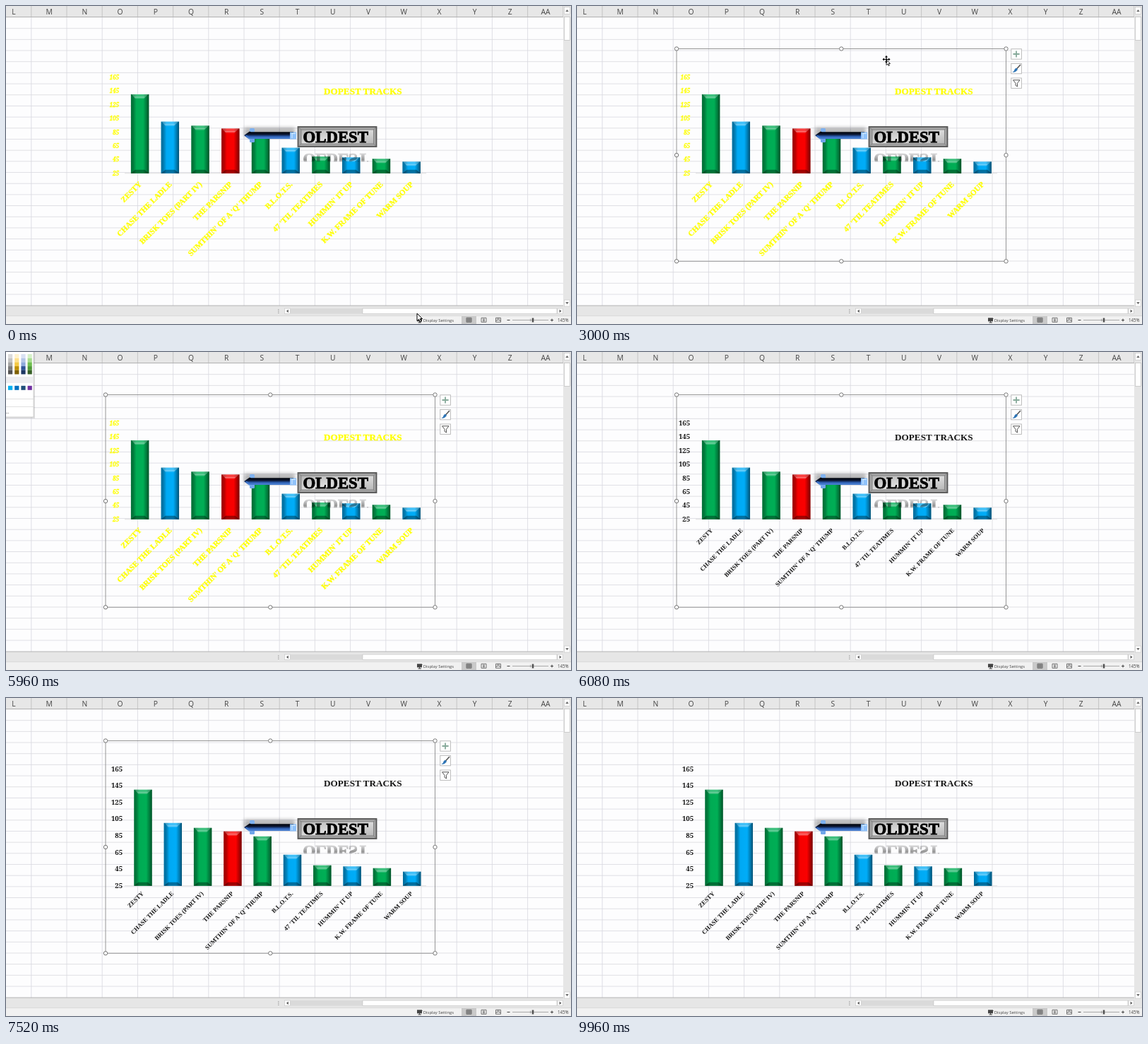
Write an HTML page that moves like this. It is 800x450 px and loops after 10 s.

```html
<!DOCTYPE html>
<html lang="en">
<head>
<meta charset="utf-8">
<title>Chart text colour</title>
<style>
html, body { margin: 0; width: 100%; height: 100%; overflow: hidden; background: #fdfdfe; }
svg { display: block; width: 100vw; height: 100vh; }
.ui { font-family: "Open Sans", "Noto Sans", sans-serif; fill: #444; }
.deco { font-family: "Liberation Serif", "Noto Serif", serif; font-weight: bold; }
.num { font-family: "Noto Serif", serif; font-weight: bold; }
</style>
</head>
<body>
<svg id="stage" viewBox="0 0 800 450">
  <defs>
    <linearGradient id="side">
      <stop offset="0" stop-opacity=".4"/>
      <stop offset=".14" stop-opacity=".3"/>
      <stop offset=".3" stop-opacity=".04"/>
      <stop offset=".68" stop-opacity=".02"/>
      <stop offset=".86" stop-opacity=".3"/>
      <stop offset="1" stop-opacity=".55"/>
    </linearGradient>
    <linearGradient id="shaft" x2="0" y2="1">
      <stop offset="0" stop-color="#000"/>
      <stop offset=".35" stop-color="#0a1530"/>
      <stop offset=".6" stop-color="#2d5fb4"/>
      <stop offset="1" stop-color="#8dbdf5"/>
    </linearGradient>
    <linearGradient id="plate" y2="1">
      <stop offset="0" stop-color="#b4b4b4"/>
      <stop offset=".5" stop-color="#dcdcdc"/>
      <stop offset="1" stop-color="#b8b8b8"/>
    </linearGradient>
    <linearGradient id="fade" gradientUnits="userSpaceOnUse" x1="0" y1="208" x2="0" y2="222">
      <stop offset="0" stop-color="#fff" stop-opacity=".12"/>
      <stop offset=".7" stop-color="#fff" stop-opacity=".42"/>
      <stop offset="1" stop-color="#fff" stop-opacity="0"/>
    </linearGradient>
    <mask id="mirror" maskUnits="userSpaceOnUse" x="410" y="205" width="120" height="20">
      <rect x="410" y="205" width="120" height="15.5" fill="url(#fade)"/>
    </mask>
    <filter id="blur" x="-30%" y="-100%" width="160%" height="300%"><feGaussianBlur stdDeviation="2.6"/></filter>
  </defs>
</svg>
<script>
const stage = document.getElementById('stage');
const LOOP = 10000;
const RECOLOR = 6080, SETTLED = 6400;

function set(node, attrs) {
  for (const key in attrs) node.setAttribute(key, attrs[key]);
  return node;
}
function el(tag, attrs, parent = stage) {
  return parent.appendChild(set(document.createElementNS('http://www.w3.org/2000/svg', tag), attrs));
}
const group = (parent) => el('g', {}, parent);
const rect = (x, y, width, height, fill, parent, more) =>
  el('rect', { x, y, width, height, fill, ...more }, parent);
const path = (d, attrs, parent) => el('path', { d, fill: 'none', ...attrs }, parent);
function text(str, x, y, size, cls, parent, more) {
  const t = el('text', { x, y, 'font-size': size, class: cls, ...more }, parent);
  t.textContent = str;
  return t;
}
const mix = (a, b, k) => a + (b - a) * k;
const clamp = (v) => Math.min(1, Math.max(0, v));
const ease = (k) => k * k * (3 - 2 * k);
const show = (node, on) => node.setAttribute('visibility', on ? 'visible' : 'hidden');

// Worksheet grid and column headings
const COL = 50.2, ROW = 15.68;
rect(0, 0, 800, 450, '#fdfdfe');
let lines = '';
for (let i = 0; i < 15; i++) lines += `M${35.8 + COL * i} 16V424`;
for (let i = 1; i <= 25; i++) lines += `M0 ${16 + ROW * i}H789`;
path(lines, { stroke: '#d9d9df', 'stroke-width': .8 });
rect(0, 0, 800, 15.6, '#e7e7e7');
path('M0 15.6H789', { stroke: '#a6a6a6', 'stroke-width': .9 });
'L M N O P Q R S T U V W X Y Z AA'.split(' ').forEach((name, i) => {
  text(name, 11 + COL * i, 12, 10.3, 'ui', stage, { 'text-anchor': 'middle', fill: '#333' });
  path(`M${35.8 + COL * i} 0V15`, { stroke: '#bdbdbd', 'stroke-width': .8 });
});

// Scroll bars
rect(789, 0, 11, 450, '#e6e6e6');
rect(790.5, 1.5, 8, 10, '#fdfdfd', stage, { stroke: '#c4c4c4', 'stroke-width': .6 });
path('M792.3 8L794.5 5L796.7 8Z', { fill: '#666' });
rect(790.5, 15.5, 8, 33, '#fff', stage, { stroke: '#bcbcbc', 'stroke-width': .7 });
rect(790.5, 416, 8, 9, '#fdfdfd', stage, { stroke: '#c4c4c4', 'stroke-width': .6 });
path('M792.3 419L794.5 422L796.7 419Z', { fill: '#666' });
rect(0, 424, 789, 14.5, '#e6e6e6');
path('M0 424H789', { stroke: '#ababab', 'stroke-width': .9 });
for (let i = 0; i < 3; i++) rect(385.3, 429.2 + i * 2.3, 1.1, 1.1, '#888');
rect(394.5, 428, 8, 7.5, '#fdfdfd', stage, { stroke: '#c4c4c4', 'stroke-width': .6 });
path('M399.8 429.5L397 431.8L399.8 434Z', { fill: '#555' });
rect(403, 428, 378, 7.5, '#dadada');
rect(505, 428, 275, 7.5, '#fff', stage, { stroke: '#c0c0c0', 'stroke-width': .6 });
rect(781, 428, 7.5, 7.5, '#fdfdfd', stage, { stroke: '#c4c4c4', 'stroke-width': .6 });
path('M783.6 429.5L786.4 431.8L783.6 434Z', { fill: '#555' });

// Status bar
rect(0, 438.5, 800, 11.5, '#f1f1f1');
path('M0 438.5H800', { stroke: '#d2d2d2', 'stroke-width': .7 });
rect(582, 441.3, 7, 5, '#444');
path('M583.5 448H588M585.5 446V448M586 446L589.5 442.5', { stroke: '#444', 'stroke-width': 1 });
text('Display Settings', 590.8, 447, 5.9, 'ui');
rect(645, 439, 21, 11, '#c9c9c9');
path('M652 441.3H659V447.3H652ZM652 443.3H659M652 445.3H659M654.3 441.3V447.3M656.7 441.3V447.3',
  { stroke: '#555', 'stroke-width': .8 });
path('M673 441.3H680V447.3H673ZM675 443H678M675 444.5H678M675 446H678', { stroke: '#555', 'stroke-width': .8 });
path('M693.5 441.3H700.5V447.3H693.5ZM693.5 445H696V441.3M700.5 445H698V441.3', { stroke: '#555', 'stroke-width': .8 });
path('M709.5 444.5H713.5M771 444.5H775M773 442.5V446.5', { stroke: '#444', 'stroke-width': 1 });
path('M717 444.5H768M742.5 442.7V446.3', { stroke: '#999', 'stroke-width': .8 });
rect(744.7, 441.5, 2.6, 6, '#555');
text('145%', 781, 447, 6.2, 'ui');

// Chart
const chart = group();
const axis = path('', { stroke: '#dcdcdc', 'stroke-width': .9 }, chart);
const GREEN = '#00b257', BLUE = '#00b0fd', RED = '#ff0000';
const data = [
  ['ZESTY', 115.3, GREEN],
  ['CHASE THE LADLE', 75.4, BLUE],
  ['BRISK TOES (PART IV)', 69.5, GREEN],
  ['THE PARSNIP', 65.3, RED],
  ["SUMTHIN' OF A 'Q' THUMP", 59.3, GREEN],
  ['B.L.O.T.S.', 37.3, BLUE],
  ["47 'TIL TEATIMES", 24.6, GREEN],
  ["HUMMIN' IT UP", 23.3, BLUE],
  ['K.W. FRAME OF TUNE', 21.2, GREEN],
  ['WARM SOUP', 17, BLUE]
];
const bars = data.map(([name, value, color]) => ({
  value,
  face: rect(0, 0, 25.4, 0, color, chart),
  shade: rect(0, 0, 25.4, 0, 'url(#side)', chart),
  top: path('', { fill: '#fff', opacity: .25 }, chart),
  gleam: path('', { stroke: '#fff', 'stroke-width': 1, opacity: .3 }, chart),
  foot: path('', { fill: '#000', opacity: .35 }, chart),
  label: text(name, 0, 0, 10, 'deco', chart, { 'text-anchor': 'end' })
}));
const ticks = [];
for (let v = 25; v <= 165; v += 20)
  ticks.push(text(v, 0, 0, 9, 'num', chart, { 'text-anchor': 'end' }));
const title = text('DOPEST TRACKS', 450, 125, 13.2, 'deco', chart);

function drawChart(k, dark) {
  const base = mix(236.8, 265.8, k), scale = mix(.97, 1.18, k);
  const first = mix(189.6, 194, k), step = mix(42.73, 42.3, k);
  const ink = dark ? '#151515' : '#ffff00';
  const outline = { fill: ink, stroke: ink, 'stroke-width': dark ? 0 : .3 };
  set(axis, { d: `M168 ${base}H595` });
  bars.forEach((b, i) => {
    const cx = first + step * i, x = cx - 12.7, r = x + 25.4;
    const h = b.value * scale, y = base - h;
    for (const part of [b.face, b.shade]) set(part, { x, y, height: h });
    set(b.top, { d: `M${x + 1} ${y}H${r - 1}L${r - 7} ${y + 6}H${x + 6}Z` });
    set(b.gleam, { d: `M${x + 5} ${y + 4}H${r - 6}` });
    set(b.foot, { d: `M${x} ${base}H${r}L${r - 6} ${base - 5}H${x + 6}Z` });
    const lx = cx + mix(3, 1.5, k), ly = mix(253, 277.3, k);
    set(b.label, { ...outline, 'font-size': dark ? 8.6 : 11, transform: `translate(${lx} ${ly}) rotate(-45)` });
  });
  ticks.forEach((t, i) => set(t, {
    ...outline, x: mix(160, 165, k), y: base - i * 20 * scale + 3,
    'font-size': dark ? 9.6 : 8, 'font-style': dark ? 'normal' : 'italic'
  }));
  set(title, outline);
}

// Arrow and plate
rect(337, 172, 72, 13, '#000', stage, { opacity: .28, filter: 'url(#blur)' });
rect(345, 173, 7, 7, '#7fb2f0', stage, { rx: 1.5 });
rect(345, 186, 7, 7, '#6fa5ea', stage, { rx: 1.5 });
path('M337 183L345 177.5L347 178.3H407V188H347L345 189.5Z', { fill: 'url(#shaft)' });
path('M340 183.5L346 187H404', { stroke: '#3c74cc', 'stroke-width': 1.6 });
rect(402, 178.5, 9, 10, '#8fc2fa');
path('M405 180V187M404 180.5H410', { stroke: '#d8ebff', 'stroke-width': 1 });
rect(413.5, 171, 111, 28, '#a3a3a3', stage, { stroke: '#555', 'stroke-width': 1.8 });
rect(418, 175, 102.5, 20, 'url(#plate)', stage, { stroke: '#858585', 'stroke-width': 1 });
path('M414.5 172L418 175M523.5 172L520.5 175M414.5 198L418 195M523.5 198L520.5 195', { stroke: '#777', 'stroke-width': .8 });
const heavy = { stroke: '#000', 'stroke-width': .9, fill: '#000' };
text('OLDEST', 420.5, 193, 22.8, 'deco', stage, heavy);
const mirror = el('g', { mask: 'url(#mirror)' });
text('OLDEST', 420.5, 193, 22.8, 'deco', mirror, { ...heavy, transform: 'matrix(1 0 0 -1 0 402)' });

// Selection frame and chart buttons
const frame = group();
rect(141, 60.5, 466.5, 300.7, 'none', frame, { stroke: '#8c8c8c', 'stroke-width': .9 });
for (const x of [141, 374.3, 607.5])
  for (const y of [60.5, 211, 361.2])
    if (x !== 374.3 || y !== 211)
      el('circle', { cx: x, cy: y, r: 2.7, fill: '#fff', stroke: '#777', 'stroke-width': 1 }, frame);
for (const y of [60.8, 81.4, 102])
  rect(614.8, y, 14.6, 14.4, '#fff', frame, { stroke: '#b5b5b5', 'stroke-width': .9 });
path('M622 63.5V72.5M617.5 68H626.6', { stroke: '#86a99a', 'stroke-width': 1.8 }, frame);
path('M628 83L622 89.5', { stroke: '#555', 'stroke-width': 1.6 }, frame);
path('M622.6 88L624 90Q621 94.5 616.5 93.5Q619.5 92 619.5 90Q620.5 87.5 622.6 88Z', { fill: '#2e75b6' }, frame);
path('M617.5 104.8H627L623.5 109.3V114L621 112.3V109.3Z', { stroke: '#555', 'stroke-width': 1 }, frame);

// Colour menu
const menu = group();
rect(-4, -4, 45, 98, '#000', menu, { opacity: .12 });
rect(-4, -4, 43, 96, '#fff', menu, { stroke: '#c6c6c6', 'stroke-width': .8 });
[['#dbdbdb', '#c4c4c4', '#a5a5a5', '#7b7b7b', '#525252'],
 ['#fff2cc', '#ffe08a', '#f5c945', '#bf9000', '#7f6000'],
 ['#d9e2f3', '#b4c6e7', '#8eaadb', '#2f5496', '#1f3864'],
 ['#d5f0c8', '#a8dd90', '#70c050', '#4f9a38', '#375f27']
].forEach((shades, c) => shades.forEach((s, r) => rect(3 + 9.2 * c, 3 + 5.7 * r, 6.2, 5.7, s, menu)));
rect(0, 35, 38.5, 9, '#ededf0', menu);
['#00b0f0', '#0070c0', '#1f4e79', '#7030a0'].forEach((c, i) => rect(3 + 9.2 * i, 47.8, 6.2, 6, c, menu));
path('M0 66.5H39M0 77.5H39', { stroke: '#d8d8d8', 'stroke-width': .8 }, menu);
text('...', -1, 87, 7, 'ui', menu);

// Tooltip
const tip = group();
rect(439.5, 87, 37, 11, '#000', tip, { opacity: .3 });
rect(438, 85.2, 36.5, 11, '#fff', tip, { stroke: '#8a8a8a', 'stroke-width': .8 });
text('Chart Area', 441, 93.1, 6.5, 'ui', tip);

// Pointers, drawn around their hot spot
const pointer = group();
const arrow = path('M0 0V10.5L2.5 8.3L4.2 12L6 11.2L4.3 7.6H7.5Z',
  { fill: '#fff', stroke: '#000', 'stroke-width': 1 }, pointer);
const cross = path('M-1.5 -5H1.5V-1.5H5V1.5H1.5V5H-1.5V1.5H-5V-1.5H-1.5Z',
  { fill: '#fff', stroke: '#222', 'stroke-width': .9 }, pointer);
const mover = group(pointer);
path('M0 0V8L2 6.5L3.2 9.2L4.4 8.6L3.2 6H5.5Z', { fill: '#fff', stroke: '#000', 'stroke-width': .8 }, mover);
path('M-4.5 0H4.5M0 -4.5V4.5', { stroke: '#000', 'stroke-width': 1.2 }, mover);
path('M0 -5.6L2 -3H-2ZM0 5.6L2 3H-2ZM-5.6 0L-3 -2V2ZM5.6 0L3 -2V2Z', { fill: '#000' }, mover);

function drawPointer(t) {
  const up = ease(clamp((t - 40) / 960)), out = ease(clamp((t - 3160) / 760));
  const x = mix(mix(582, 438, up), 104, out);
  const y = mix(mix(435, 75.5, up), -24, out);
  const inChart = x > 141 && x < 607 && y > 60 && y < 361;
  const onCells = y > 16 && y < 424;
  show(arrow, !onCells);
  show(cross, onCells && !inChart);
  show(mover, inChart);
  set(pointer, { transform: `translate(${x} ${y})`, display: out < 1 ? 'inline' : 'none' });
}

function draw(t) {
  drawChart(ease(clamp((t - RECOLOR) / (SETTLED - RECOLOR))), t >= RECOLOR);
  drawPointer(t);
  show(tip, t >= 1480 && t < 1880);
  show(frame, t >= 1880 && t < 7800);
  show(menu, t >= 5000 && t < RECOLOR);
}

const start = performance.now();
function tick() {
  draw((performance.now() - start) % LOOP);
  requestAnimationFrame(tick);
}
draw(0);
requestAnimationFrame(tick);
</script>
</body>
</html>
```
